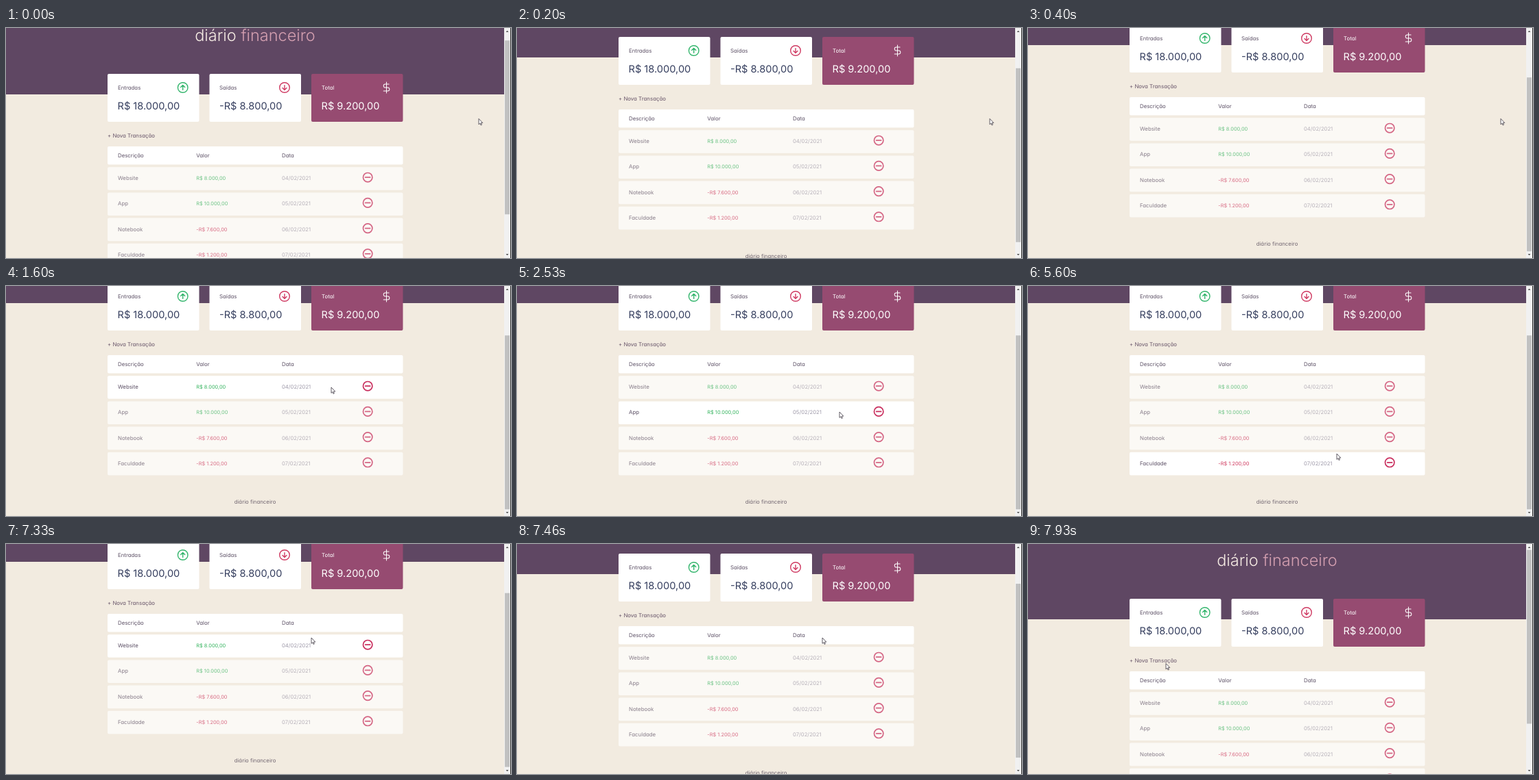
Write an HTML page that moves like this. It is 736 by 336 pixels and loops after 8000 ms.

```html
<!DOCTYPE html>
<html lang="pt-BR">
<head>
<meta charset="utf-8">
<title>diário financeiro</title>
<style>
  html, body { margin: 0; width: 100%; height: 100%; overflow: hidden; background: #f2ebe0; }
  svg { display: block; width: 736px; height: 336px; }
  text {
    font: 400 7.85px Inter, "Open Sans", sans-serif;
    font-feature-settings: "cv11";
    text-rendering: geometricPrecision;
    fill: #5d5166;
  }
  .title { font-size: 23.5px; font-weight: 300; font-feature-settings: normal; fill: #f6ece4; }
  .title tspan { fill: #d5a0b1; }
  .sum { font-size: 14.6px; fill: #363f5f; }
  .total text { fill: #fff; }
  .add { fill: #69566a; }
  .foot { fill: #756a74; }
  .row { opacity: .7; }
  .row.on { opacity: 1; }
  .money { font-size: 7.4px; }
  .in { fill: #36b45f; }
  .out { fill: #cf3a5f; }
  .date { font-size: 7.7px; fill: #9d98a8; }
  .line { fill: none; stroke-width: 1.4; stroke-linecap: round; stroke-linejoin: round; }
  .minus { stroke: #c9305f; stroke-width: 1.7; }
</style>
</head>
<body>
<svg viewBox="0 0 736 336">
  <g id="page">
    <rect width="726" height="110" fill="#5f4763"/>
    <text class="title" x="363" y="32" text-anchor="middle">diário <tspan>financeiro</tspan></text>

    <g>
      <rect x="148" y="80" width="133.5" height="70" rx="2" fill="#fff"/>
      <text x="163" y="103">Entradas</text>
      <text class="sum" x="162.5" y="132.4">R$ 18.000,00</text>
      <path class="line" stroke="#33b56c" transform="translate(257.7 100)"
        d="M-7.3 0a7.3 7.3 0 1 0 14.6 0a7.3 7.3 0 1 0 -14.6 0M0 3.4V-3.4M-3 -.4L0 -3.4L3 -.4"/>
    </g>
    <g>
      <rect x="296.5" y="80" width="133.5" height="70" rx="2" fill="#fff"/>
      <text x="311" y="103">Saídas</text>
      <text class="sum" x="311" y="132.4">-R$ 8.800,00</text>
      <path class="line" stroke="#cf3a62" transform="translate(406 100)"
        d="M-7.3 0a7.3 7.3 0 1 0 14.6 0a7.3 7.3 0 1 0 -14.6 0M0 -3.4V3.4M-3 .4L0 3.4L3 .4"/>
    </g>
    <g class="total">
      <rect x="445" y="80" width="133.5" height="70" rx="2" fill="#964b71"/>
      <text x="460" y="103" font-weight="500">Total</text>
      <text class="sum" x="459.5" y="132.4">R$ 9.200,00</text>
      <path class="line" stroke="#fff" transform="translate(545.9 91.4) scale(.72)"
        d="M12 1v22M17 5H9.5a3.5 3.5 0 0 0 0 7h5a3.5 3.5 0 0 1 0 7H6"/>
    </g>

    <text class="add" x="148" y="173.3">+ Nova Transação</text>
    <rect x="148" y="186" width="430.5" height="26.5" rx="2" fill="#fff"/>
    <text x="163" y="202">Descrição</text>
    <text x="277.3" y="202">Valor</text>
    <text x="402" y="202">Data</text>
    <g id="rows"></g>
    <text class="foot" x="363" y="403" text-anchor="middle">diário financeiro</text>
  </g>

  <rect x="726" width="9" height="336" fill="#f1f1f1"/>
  <rect x="735" width="1" height="336" fill="#2a2a2a"/>
  <path d="M728.6 6L730.5 3.8L732.4 6zM728.6 330L730.5 332.2L732.4 330z" fill="#505050"/>
  <rect id="thumb" x="727" width="7" height="254" fill="#c1c1c1"/>
  <path id="cursor" d="M0 0V8.4L1.9 6.7L3.1 9.5L4.4 8.9L3.2 6.2L5.8 6.1Z"
    fill="#fff" stroke="#3b3540" stroke-width=".8" stroke-linejoin="round"/>
</svg>

<script>
const LOOP = 8000, STEP = 1000 / 15;
const ROW_TOP = 216.2, ROW_GAP = 37.2, ROW_H = 33.6, MAX_SCROLL = 85;
const $ = id => document.getElementById(id);

const entries = [
  ["Website", "R$ 8.000,00"],
  ["App", "R$ 10.000,00"],
  ["Notebook", "-R$ 7.600,00"],
  ["Faculdade", "-R$ 1.200,00"],
];

$("rows").innerHTML = entries.map(([name, value], i) => `
  <g class="row" transform="translate(0 ${ROW_TOP + i * ROW_GAP})">
    <rect x="148" width="430.5" height="${ROW_H}" rx="2" fill="#fff"/>
    <text x="163" y="19">${name}</text>
    <text class="money ${value[0] === "-" ? "out" : "in"}" x="277.3" y="19">${value}</text>
    <text class="date" x="402" y="19">0${i + 4}/02/2021</text>
    <circle class="line minus" cx="527.2" cy="15" r="6.7"/>
    <path class="line minus" d="M523.7 15h7"/>
  </g>`).join("");
const rows = [...document.querySelectorAll(".row")];

// Pointer stops: tick, x, y
const stops = [
  [16, 689, 132.5], [24, 474, 148], [34, 474, 148], [38, 470, 184],
  [49, 470, 184], [55, 455, 248], [64, 455, 248], [67, 453, 277],
  [77, 453, 277], [79, 452, 256], [83, 452, 256], [84, 450, 245],
  [86, 448, 222], [99, 448, 222], [103, 446, 184], [106, 446, 184],
  [110, 445, 137], [113, 445, 137], [119, 201, 174.5],
];

const clamp = p => Math.min(1, Math.max(0, p));
const smooth = p => p * p * (3 - 2 * p);
const inOut = p => p < .5 ? 2 * p * p : 1 - 2 * (1 - p) ** 2;

function pointer(k) {
  const n = stops.findIndex(s => s[0] >= k);
  if (n < 1) return stops[n ? stops.length - 1 : 0].slice(1);
  const [a, ax, ay] = stops[n - 1], [b, bx, by] = stops[n];
  const p = smooth((k - a) / (b - a));
  return [ax + (bx - ax) * p, ay + (by - ay) * p];
}

function scrollAt(k) {
  if (k < 60) return MAX_SCROLL - 72 * (1 - clamp(k / 6)) ** 2;
  return MAX_SCROLL * (1 - inOut(clamp((k - 109.5) / 7.5)));
}

function draw(now) {
  const k = Math.floor((now % LOOP + 7) / STEP) % 120;
  const scroll = scrollAt(k), [x, y] = pointer(k);
  $("page").setAttribute("transform", `translate(0 ${-Math.round(scroll)})`);
  $("thumb").setAttribute("y", 8.5 + scroll * .75);
  $("cursor").setAttribute("transform", `translate(${x} ${y})`);
  rows.forEach((row, i) => {
    const dy = y + scroll - ROW_TOP - i * ROW_GAP;
    row.classList.toggle("on", x > 148 && x < 578.5 && dy >= 0 && dy < ROW_H);
  });
}

const start = performance.now();
function frame() {
  draw(performance.now() - start);
  requestAnimationFrame(frame);
}
frame();
</script>
</body>
</html>
```
